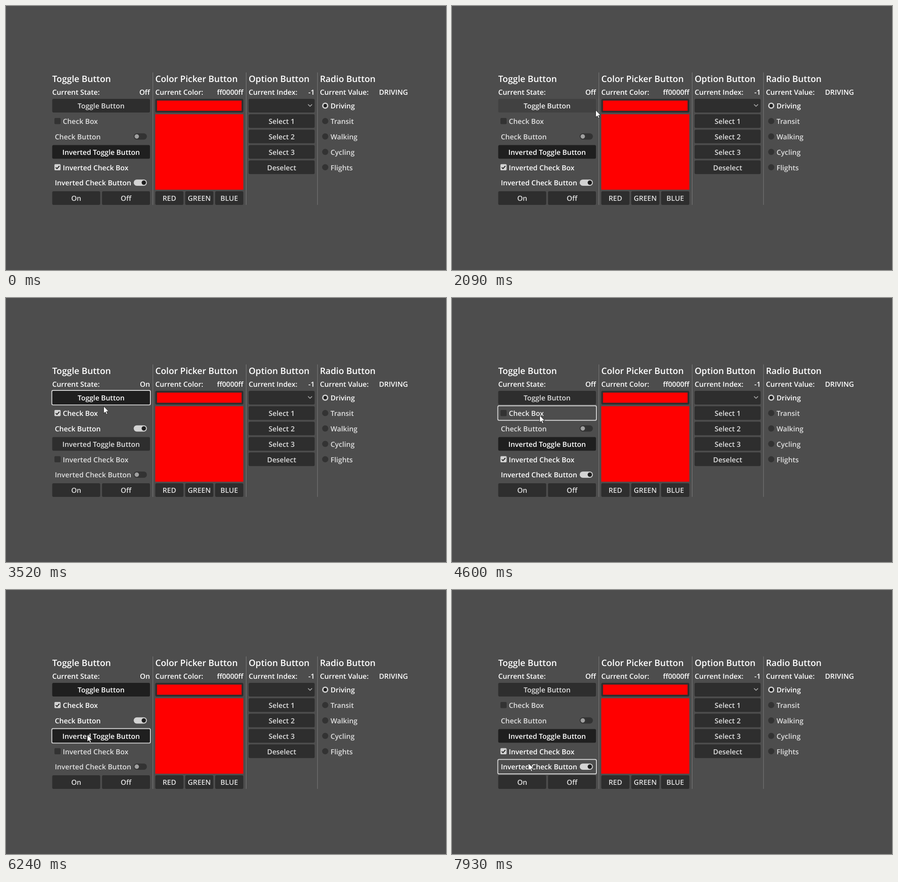
These frames come from a looping animation (966 px wide and 580 px high, 8 s). An HTML page:

```html
<!DOCTYPE html>
<html lang="en">
<head>
<meta charset="utf-8">
<title>Button states</title>
<style>
  html, body { margin: 0; width: 100%; height: 100%; overflow: hidden; background: #4d4d4d; }
  svg { display: block; }
  text {
    font: 600 16px "Open Sans", "Noto Sans", sans-serif;
    fill: #dfdfdf;
    text-rendering: geometricPrecision;
    white-space: pre;
  }
  .title { font-size: 20px; }
  .label, .title, .lit { fill: #fff; }
  .mid { text-anchor: middle; }
  .end { text-anchor: end; }
  .box { fill: #2e2e2e; }
  .dim { fill: #333; }
  .bright { fill: #d3d3d3; }
  .ink { fill: #1f1f1f; }
  .red { fill: #f00; }
  .row.hover .box { fill: #414141; }
  .row.hover text, .row.focus text { fill: #f2f2f2; }
  .row.down .box, .row.on .box { fill: #1f1f1f; }
  .row.down text, .row.on text { fill: #fff; }
  .row .yes, .row.on .no { display: none; }
  .row.on .yes { display: inline; }
</style>
</head>
<body>
<svg id="stage" width="966" height="580" viewBox="0 0 966 580">
  <g id="ui" transform="scale(.966667)"></g>
  <path id="cursor" d="M.5 .8V16.6L4.1 13.2 6.5 18.6 9 17.5 6.6 12.2H11.6Z"
        fill="#fff" stroke="#1a1a1a" stroke-width=".9" stroke-linejoin="round"/>
</svg>
<script>
const LOOP = 8000, FRAME = 70, SCALE = 29 / 30;
const TOP = 211, PITCH = 35, HEIGHT = 31, LEFT = 105, RIGHT = 327;
const ui = document.getElementById('ui');
const cursor = document.getElementById('cursor');

function add(parent, tag, attrs, text) {
  const el = document.createElementNS('http://www.w3.org/2000/svg', tag);
  for (const key in attrs) el.setAttribute(key, attrs[key]);
  if (text) el.textContent = text;
  parent.appendChild(el);
  return el;
}
const rowY = row => TOP + row * PITCH;
const rect = (parent, x, y, width, height, cls, rx = 0) =>
  add(parent, 'rect', { x, y, width, height, class: cls, rx });
const write = (parent, x, y, text, cls = '') => add(parent, 'text', { x, y, class: cls }, text);
const circle = (parent, cx, cy, r, cls) => add(parent, 'circle', { cx, cy, r, class: cls });

function button(parent, x, width, row, text) {
  rect(parent, x, rowY(row), width, HEIGHT, 'box', 3);
  write(parent, x + width / 2, rowY(row) + 22, text, 'mid');
}

function checkBox(parent, row, text) {
  const y = rowY(row) + 8.5;
  rect(parent, 110, y, 14, 14, 'no dim', 2);
  rect(parent, 110, y, 14, 14, 'yes bright', 2);
  add(parent, 'path', {
    class: 'yes', d: `M113 ${y + 7.3}l2.8 2.8 5.4 -6`,
    fill: 'none', stroke: '#1f1f1f', 'stroke-width': 2
  });
  write(parent, 129, rowY(row) + 22, text);
}

function checkButton(parent, row, text) {
  const mid = rowY(row) + 15.5;
  rect(parent, 290, mid - 7, 30, 14, 'no dim', 7);
  circle(parent, 297, mid, 5, 'no').setAttribute('fill', '#a0a0a0');
  rect(parent, 290, mid - 7, 30, 14, 'yes bright', 7);
  circle(parent, 313, mid, 5, 'yes ink');
  write(parent, 111, rowY(row) + 22, text);
}

function column(x, right, title, label, value) {
  write(ui, x, 173, title, 'title');
  write(ui, x, 202, label, 'label');
  return write(ui, right, 202, value, 'label end');
}

// Static columns
const stateText = column(LEFT, RIGHT, 'Toggle Button', 'Current State:', 'Off');
column(339, 539, 'Color Picker Button', 'Current Color:', 'ff0000ff');
column(551, 701, 'Option Button', 'Current Index:', '-1');
column(713, 913, 'Radio Button', 'Current Value:', 'DRIVING');
for (const x of [333, 545, 707]) rect(ui, x, 151, 1, 301).setAttribute('fill', '#808080');

button(ui, LEFT, 109, 6, 'On');
button(ui, 218, 109, 6, 'Off');

rect(ui, 339, TOP, 200, HEIGHT, 'box', 3);
rect(ui, 343, TOP + 4, 192, 23, 'red');
rect(ui, 339, 246, 200, 171.5, 'red');
['RED', 'GREEN', 'BLUE'].forEach((name, i) => button(ui, 339 + i * 68, 64, 6, name));

['', 'Select 1', 'Select 2', 'Select 3', 'Deselect'].forEach((name, i) => button(ui, 551, 150, i, name));
add(ui, 'path', {
  d: 'M686.5 224l4 4 4-4', fill: 'none', stroke: '#a4a4a4',
  'stroke-width': 1.8, 'stroke-linecap': 'round', 'stroke-linejoin': 'round'
});

['Driving', 'Transit', 'Walking', 'Cycling', 'Flights'].forEach((name, i) => {
  const mid = rowY(i) + 15.5;
  circle(ui, 725, mid, 7, i ? 'dim' : 'bright');
  if (!i) circle(ui, 725, mid, 4, 'ink');
  write(ui, 737, rowY(i) + 22, name, i ? '' : 'lit');
});

// Linked toggles
const kinds = [(g, row, text) => button(g, LEFT, RIGHT - LEFT, row, text), checkBox, checkButton];
const names = ['Toggle Button', 'Check Box', 'Check Button'];
const rows = [...names, ...names.map(n => 'Inverted ' + n)].map((text, i) => {
  const g = add(ui, 'g', { class: 'row' });
  kinds[i % 3](g, i, text);
  return g;
});
const ring = add(ui, 'rect', {
  x: LEFT - 1, width: RIGHT - LEFT + 2, height: HEIGHT + 2, rx: 3,
  fill: 'none', stroke: '#fff', 'stroke-opacity': .75, 'stroke-width': 2
});

// Pointer legs: start, end, target x, target y, easing
const smooth = p => p * p * (3 - 2 * p);
const out = power => p => 1 - (1 - p) ** power;
const launch = p => smooth(p * .8) / smooth(.8);
const ENTER = 1450;
const legs = [
  [ENTER, 2090, 315, 228, launch],
  [2090, 2370, 257, 217, out(3)],
  [3170, 3520, 214, 237, p => p ** 1.3],
  [3520, 3800, 193, 254, out(1.8)],
  [4530, 4880, 182, 285, smooth],
  [5430, 5780, 178, 317, out(1.8)],
  [6440, 6790, 176.5, 350, smooth],
  [7320, 7530, 167.5, 380, smooth]
];
const presses = [2770, 4060, 5160, 6240, 7190, 7860];

function pointer(t) {
  let x = 616, y = 531;
  for (const [start, end, toX, toY, ease] of legs) {
    if (t < start) break;
    const steps = Math.round((end - start) / FRAME);
    const p = Math.min(1, Math.floor((t - start) / (end - start) * steps + 1e-6) / steps);
    x += (toX - x) * ease(p);
    y += (toY - y) * ease(p);
  }
  return [Math.round(x * 2) / 2, Math.round(y)];
}

function rowAt(x, y) {
  const ux = x / SCALE, uy = y / SCALE - TOP;
  if (ux < LEFT || ux >= RIGHT || uy < 0 || uy % PITCH >= HEIGHT) return -1;
  return Math.floor(uy / PITCH);
}

function draw(t) {
  const visible = t >= ENTER;
  const [x, y] = pointer(t);
  cursor.style.display = visible ? '' : 'none';
  cursor.setAttribute('transform', `translate(${x} ${y})`);

  const focus = presses.filter(p => t >= p).length - 1;
  const clicks = presses.filter(p => t >= p + FRAME).length;
  const on = clicks % 2 === 1;
  const held = focus >= clicks ? focus : -1;
  const hover = visible ? rowAt(x, y) : -1;

  stateText.textContent = on ? 'On' : 'Off';
  ring.style.display = focus < 0 ? 'none' : '';
  ring.setAttribute('y', rowY(Math.max(focus, 0)) - 1);
  rows.forEach((g, i) => {
    g.classList.toggle('on', on !== i > 2);
    g.classList.toggle('hover', i === hover && i !== held);
    g.classList.toggle('focus', i === focus);
    g.classList.toggle('down', i === held);
  });
}

const begin = performance.now();
function tick() {
  draw((performance.now() - begin) % LOOP);
  requestAnimationFrame(tick);
}
tick();
</script>
</body>
</html>
```
